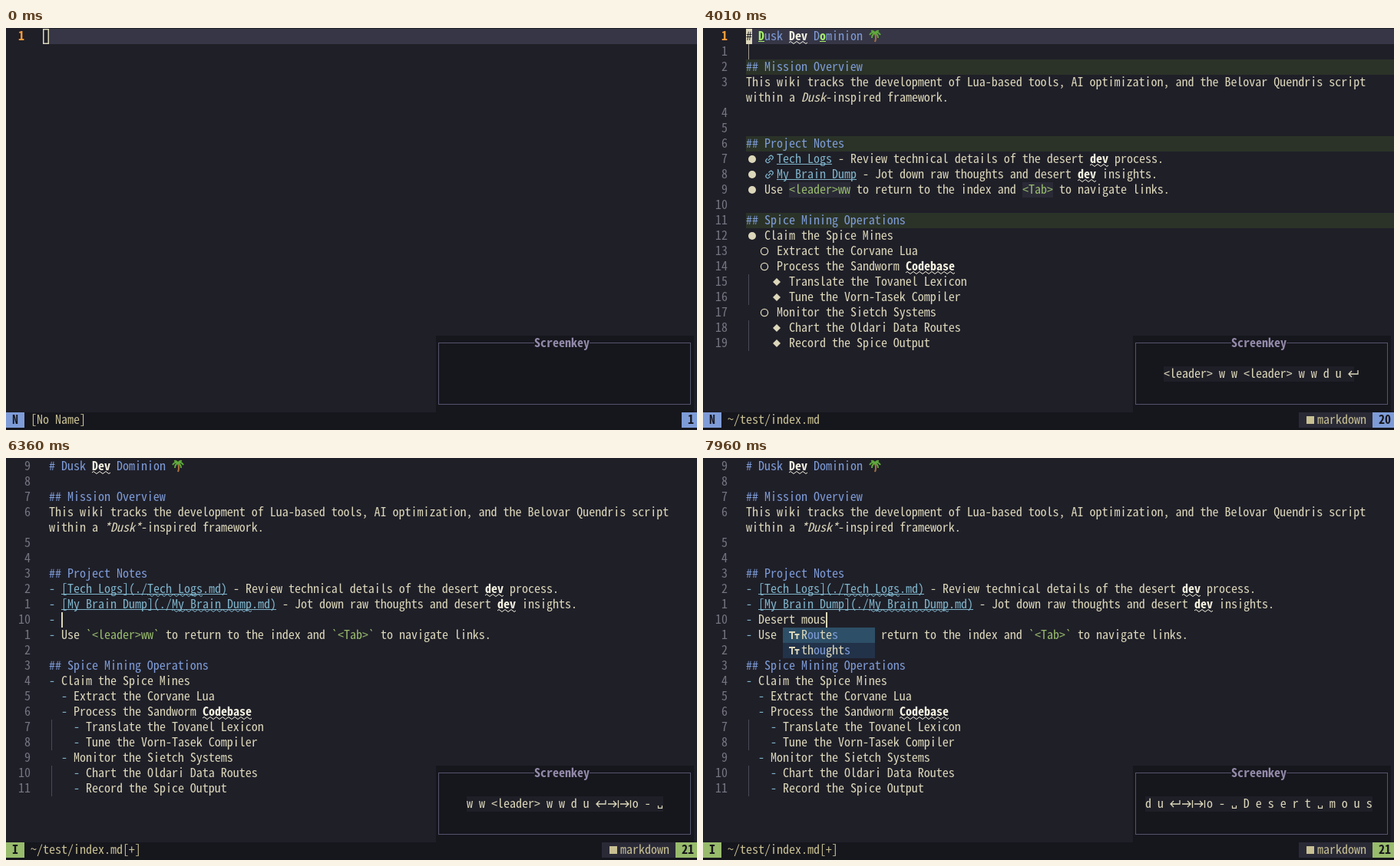
Animation of 900x524 px, one loop 8000 ms. Source, as an HTML page:

```html
<!DOCTYPE html>
<html lang="en">
<head>
<meta charset="utf-8">
<title>Wiki notes in a terminal editor</title>
<style>
  html, body { margin: 0; width: 100%; height: 100%; overflow: hidden; background: #1f1f28; }
  svg { display: block; width: 900px; height: 524px; }
  text {
    font-family: "Noto Sans Mono CJK JP", "Noto Sans Mono CJK SC", "Noto Sans Mono", "DejaVu Sans Mono", monospace;
    font-variant-ligatures: none; font-kerning: none;
    white-space: pre; fill: #dcd7ba;
  }
  .h { fill: #7e9cd8 }
  .s { fill: #f4f1e0; font-weight: bold }
  .i { font-style: italic }
  .l, .m, .d { fill: #7fb4ca }
  .b, .c { fill: #98bb6c }
  .g { fill: #a6f06a; font-weight: bold }
  .y { fill: #5fe8f0; font-weight: bold }
  .n { fill: #757480 }
  .o { fill: #ff9e3b; font-weight: bold }
  .t { fill: #938aa9; font-weight: bold }
  .f { fill: #c8c093 }
  .x { fill: #54546d }
  .r { fill: #d27e99 }
  .k { fill: #16161d; font-weight: bold }
  .q { fill: #1f1f28 }
</style>
</head>
<body>
<svg id="stage" viewBox="0 0 900 524" xmlns="http://www.w3.org/2000/svg"></svg>
<script>
const CW = 8, CH = 20, LOOP = 8000;
const FG = '#dcd7ba', BG = '#1f1f28', DARK = '#16161d', LINE = '#363646', EDGE = '#54546d';
const stage = document.getElementById('stage');

// Pick the font size whose advance is exactly one cell.
const pen = document.createElement('canvas').getContext('2d');
pen.font = '16px "Noto Sans Mono CJK JP","Noto Sans Mono CJK SC","Noto Sans Mono","DejaVu Sans Mono",monospace';
stage.style.fontSize = 16 * CW * 10 / pen.measureText('MMMMMMMMMM').width + 'px';

const esc = s => s.replace(/&/g, '&amp;').replace(/</g, '&lt;');
const rowTop = row => 1 + row * CH;
const rect = (x, y, w, h, fill) => `<rect x="${x}" y="${y}" width="${w}" height="${h}" fill="${fill}"/>`;
const cells = (col, row, w, fill, h = 1) => rect(col * CW, rowTop(row), w * CW, h * CH, fill);
const path = (d, color, width = 1) => `<path d="${d}" fill="none" stroke="${color}" stroke-width="${width}"/>`;
const shape = (d, fill) => `<path d="${d}" fill="${fill}"/>`;
const text = (col, row, s, cls = '') =>
  s.trim() ? `<text class="${cls}" x="${col * CW}" y="${16 + row * CH}">${esc(s)}</text>` : '';

const under = { l: '#7fb4ca', m: '#7fb4ca', g: '#a6f06a', y: '#5fe8f0' };
const waves = { s: '#f4f1e0', m: '#7fb4ca' };

function wave(col, row, n, color) {
  let d = `M${col * CW} ${19 + row * CH}`;
  for (let i = 0; i < n * 2; i++) d += `q2 ${i % 2 ? 3 : -3} 4 0`;
  return path(d, color);
}

// Text with {class|words} runs.
function rich(col, row, s) {
  let out = '';
  for (const [all, cls, body] of s.matchAll(/\{(\w)\|([^}]*)\}|[^{]+/g)) {
    const str = cls ? body : all, n = str.length;
    if (cls === 'b') out += cells(col, row, n, '#2a2a37');
    out += cls === 'a' ? chain(col, row) : text(col, row, str, cls);
    if (under[cls]) out += rect(col * CW, 17 + row * CH, n * CW, 1, under[cls]);
    if (waves[cls]) out += wave(col, row, n, waves[cls]);
    col += n;
  }
  return out;
}

const chain = (col, row) => `<g transform="translate(${col * CW + 6.5} ${11 + row * CH}) rotate(-45)">` +
  path('M-1 -2.5h-2a2.5 2.5 0 0 0 0 5h2M1 -2.5h2a2.5 2.5 0 0 1 0 5h-2M-2.5 0h5', '#7fb4ca', 1.3) + '</g>';

const palm = (x, y) => path(`M${x + 8} ${y + 18}q2 -5 0 -11`, '#a9713f', 2) +
  path(`M${x + 8} ${y + 7}q-4 -3 -7 2M${x + 8} ${y + 7}q-4 1 -4 6M${x + 8} ${y + 7}q4 1 4 6` +
    `M${x + 8} ${y + 7}q4 -3 7 2M${x + 8} ${y + 7}q-2 -4 -5 -3M${x + 8} ${y + 7}q2 -4 5 -3`, '#5fa83c', 2);

const block = (col, row, ch) => cells(col, row, 1, FG) + text(col, row, ch, 'q');
const bar = (col, row) => rect(col * CW, rowTop(row), 2, CH, FG);

/* ---- document ---- */
const link = (name, raw) => {
  const file = name.replace(/ /g, '_');
  return raw ? `{l|[${name}](./}{m|${file}}{l|.md)}` : `{a|  }{l|${name}}`;
};
const code = (s, raw) => raw ? `{c|\`${s}\`}` : `{b|${s}}`;

// Leading digit is a list depth, "~" continues the line above.
const lines = raw => [
  '{h|# Dusk }{s|Dev}{h| Dominion}',
  '',
  '{h|## Mission Overview}',
  'This wiki tracks the development of Lua-based tools, AI optimization, and the Belovar Quendris script',
  `~within a {i|${raw ? '*Dusk*' : 'Dusk'}}-inspired framework.`,
  '',
  '',
  '{h|## Project Notes}',
  `0-${link('Tech Logs', raw)} - Review technical details of the desert {s|dev} process.`,
  `0-${link('My_Brain_Dump', raw)} - Jot down raw thoughts and desert {s|dev} insights.`,
  `0-Use ${code('<leader>ww', raw)} to return to the index and ${code('<Tab>', raw)} to navigate links.`,
  '',
  '{h|## Spice Mining Operations}',
  '0-Claim the Spice Mines',
  '1-Extract the Corvane Lua',
  '1-Process the Sandworm {s|Codebase}',
  '2-Translate the Tovanel Lexicon',
  '2-Tune the Vorn-Tasek Compiler',
  '1-Monitor the Sietch Systems',
  '2-Chart the Oldari Data Routes',
  '2-Record the Spice Output'
];

function bullet(depth, row) {
  const x = (8 + 2 * depth) * CW, y = 11 + row * CH;
  if (depth === 0) return `<circle cx="${x}" cy="${y}" r="5" fill="${FG}"/>`;
  if (depth === 1) return `<circle cx="${x}" cy="${y}" r="4.6" fill="none" stroke="${FG}" stroke-width="1.3"/>`;
  return shape(`M${x} ${y - 5}l5 5l-5 5l-5 -5z`, FG);
}

const guide = (row, color = '#4a4a58') => rect(59, rowTop(row), 1, CH, color);

// raw: plain markdown; cur: cursor row; swap: {row: text} shown in place of a line
function doc({ raw = false, cur, swap = {}, typed = '' }) {
  const list = lines(raw);
  if (raw) list.splice(10, 0, typed);
  const numbers = [];
  let n = 0;
  list.forEach((s, r) => numbers[r] = s[0] === '~' ? 0 : ++n);
  let out = '';
  list.forEach((s, row) => {
    const here = row === cur && !raw;
    if (here) out += cells(7, row, 106, LINE);
    else if (!raw && s.startsWith('{h|# ')) out += cells(7, row, 106, '#49443c');
    else if (!raw && s.startsWith('{h|##')) out += cells(7, row, 106, '#2b3328');
    if (numbers[row]) {
      const num = String(row === cur ? numbers[row] : Math.abs(numbers[row] - numbers[cur]));
      out += text(4 - num.length, row, num, here ? 'o' : 'n');
    }
    const item = s.match(/^(\d)-(.*)$/);
    if (item) {
      const depth = +item[1], col = 7 + 2 * depth;
      if (depth === 2) out += guide(row);
      out += raw || swap[row] ? text(col, row, '-', 'd') : bullet(depth, row);
      out += rich(raw ? col + 2 : col + 3, row, swap[row] || item[2]);
    } else {
      out += rich(7, row, swap[row] || s.replace('~', ''));
    }
  });
  return out + palm(216, 0);
}

/* ---- chrome ---- */
function status(mode, name, count, type) {
  const strip = rect(0, 501, 900, 23, DARK);
  if (!mode) return strip + text(0, 25, name, 'x');
  const color = mode === 'I' ? '#98bb6c' : '#7e9cd8';
  const at = count.length > 1 ? 110 : 111;
  let out = strip + cells(0, 25, 3, color) + text(1, 25, mode, 'k') + text(4, 25, name, 'f');
  if (type) out += cells(97, 25, 12, '#2a2a37') + rect(786, 506, 10, 10, '#c8c093') + text(100, 25, type, 'f');
  return out + rect((at - 1) * CW, 501, 900, 20, color) + text(at, 25, count, 'k');
}

const icons = {
  '⏎': x => path(`M${x + 13} 446v5h-12m4 -4l-4 4l4 4`, FG, 1.3),
  '⇥': x => path(`M${x} 451h11m-4 -4l4 4l-4 4M${x + 13.5} 446v10`, FG, 1.3),
  '␣': x => path(`M${x + 1.5} 453v3.4h5v-3.4`, FG, 1.2)
};

function keys(s) {
  const list = s ? s.split(' ') : [];
  while (list.join(' ').length > 38) list.shift();
  const line = list.join(' '), n = line.length, col = Math.floor(91 - n / 2);
  let out = cells(70, 20, 42, DARK, 5) +
    `<rect x="563.5" y="410.5" width="328" height="80" fill="none" stroke="${EDGE}"/>` +
    cells(86, 20, 9, DARK) + text(86, 20, 'Screenkey', 't') + cells(col, 22, n, BG) +
    text(col, 22, line.replace(/[⏎⇥␣]/g, ' '));
  [...line].forEach((c, i) => { if (icons[c]) out += icons[c]((col + i) * CW); });
  return out;
}

const folder = (x, y) => shape(`M${x + 1} ${y + 14}v-9q0 -1 1 -1h4l2 2h5q1 0 1 1v1h-9l-3 6z` +
  `M${x + 2} ${y + 15}l3 -6h11l-3 6z`, '#c8bd8c');

function picker(query, items, count) {
  let out = cells(15, 9, 82, DARK, 7) +
    `<rect x="123.5" y="190.5" width="648" height="120" rx="3" fill="none" stroke="${EDGE}"/>` +
    cells(49, 9, 13, DARK) + text(50, 9, 'Select wiki', 't') +
    path('M129 206l5 5l-5 5', '#7fb4ca', 2) + text(18, 10, query) + bar(18 + query.length, 10) +
    text(92, 10, count, 'x') + rect(128, 230, 640, 1, EDGE) + cells(16, 12, 80, '#223249');
  items.forEach(([num, name], i) => {
    out += text(17, 12 + i, num + '.', 'r') + folder(160, rowTop(12 + i)) + rich(23, 12 + i, name);
  });
  return out;
}

// Mark the letters of the pattern in order; letters not found are skipped.
function mark(word, pat) {
  const hit = new Set();
  let from = 0;
  for (const c of pat.toLowerCase()) {
    const at = word.toLowerCase().indexOf(c, from);
    if (at >= 0) { hit.add(at); from = at + 1; }
  }
  return [...word].map((c, i) => hit.has(i) ? `{h|${c}}` : c).join('');
}

function popup(col, pat, words) {
  const list = words.split(' '), scroll = list.length > 9;
  const w = 7 + Math.max(...list.map(s => s.length)) + (scroll ? 2 : 0);
  let out = cells(col, 11, w, '#223249', list.length) + cells(col, 11, w, '#2d4f67');
  if (scroll) out += cells(col + w - 1, 11, 1, '#2d4f67', 6);
  list.forEach((s, i) => {
    const x = (col + 1) * CW, y = rowTop(11 + i);
    out += s.endsWith('~')
      ? path(`M${x + 4} ${y + 5}h-3v3m0 4v3h3m6 0h3v-3m0 -4v-3h-3M${x + 4.5} ${y + 7.5}h5m-2.5 0v6`, '#7fb4ca', 1.2)
      : path(`M${x} ${y + 6}h8m-4 0v9M${x + 7.5} ${y + 9}h6m-3 0v6`, FG, 2);
    out += rich(col + 3, 11 + i, mark(s, pat));
  });
  return out;
}

/* ---- screens ---- */
const FILE = '~/test/index.md', OPEN = '<leader> w w <leader> w w';
const empty = (cursor, k) => cells(6, 0, 107, LINE) + text(2, 0, '1', 'o') + cursor +
  keys(k) + status('N', '[No Name]', '1');
const hollow = `<rect x="48.75" y="1.75" width="6.5" height="18.5" fill="${BG}" stroke="${FG}" stroke-width="1.5"/>`;
const solid = cells(6, 0, 1, FG);
const choose = (k, ...args) => text(2, 0, '1', 'n') + picker(...args) + keys(k) + status('', '[No Name]');
const view = (opts, cursor, k) => doc(opts) + cursor + keys(OPEN + ' d u ⏎' + k) + status('N', FILE, '20', 'markdown');
function edit(typed, k, pop = '') {
  const line = typed && '0-' + typed.slice(2);
  return doc({ raw: true, cur: 10, typed: line }) + bar(7 + typed.length, 10) + pop +
    keys(OPEN + ' d u ⏎ ⇥ ⇥ o' + k) + status('I', FILE + '[+]', '21', 'markdown');
}

const all = [['1', '{f|wiki}'], ['2', '{f|dusk}'], ['3', '{f|todo}']];
const title = '{h|  }{g|D}{h|usk }{s|Dev}{h| D}{g|o}{h|minion}';
const logs = link('Tech Logs', true) + ' - ';
const logsTail = 'Review technical details of the desert {s|dev} process.';
const dump = '{l|[}{m|My_Brain_Dump}{l|](./}{g|M}{m|y_Brain_Dump}{l|.m}{g|d}{l|)} - {g|J}ot do{g|w}n ra{y|w} ' +
  't{g|h}oughts and d{g|e}sert {s|dev} insi{y|g}hts.';

const screens = [
  [0, empty(hollow, '')],
  [1070, empty(solid, '')],
  [2160, empty(solid, '<leader> w')],
  [2410, choose(OPEN, '', all, '3/3')],
  [3210, choose(OPEN, 'd', all, '3/3')],
  [3480, choose(OPEN + ' d u', 'du', [['2', '{h|du}{f|sk}']], '1/3')],
  [3730, empty(solid, OPEN + ' d u ⏎')],
  [4010, view({ cur: 0, swap: { 0: title } }, block(7, 0, '#') + guide(1, '#a09d90'), '')],
  [4810, view({ cur: 8, swap: { 8: logs + logsTail.replace('R', '{g|R}') } }, block(11, 8, 'T'), ' ⇥')],
  [5060, view({ cur: 9, swap: { 8: logs + logsTail } }, block(12, 9, 'M'), ' ⇥')],
  [5310, view({ cur: 9, swap: { 9: dump } }, block(11, 9, 'M'), ' ⇥ ⇥')],
  [5580, edit('', '')],
  [6360, edit('- ', ' - ␣')],
  [6610, edit('- D', ' - ␣ D',
    popup(6, 'D', 'Dev Dominion Dusk Data desert development details down dev dateMDY~'))],
  [6860, edit('- De', ' - ␣ D e',
    popup(6, 'De', 'Dev desert development details dev dateMDY~ datetime~ dateDMY~ dateMDY~ datetime~'))],
  [7140, edit('- Dese', ' - ␣ D e s e',
    popup(6, 'Dese', 'desert Codebase development datetime~ datetime~'))],
  [7410, edit('- Desert ', ' - ␣ D e s e r t ␣')],
  [7690, edit('- Desert m', ' - ␣ D e s e r t ␣ m',
    popup(13, 'm', 'Mission Mining Mines Monitor md My_Brain_Dump Dominion framework optimization dateMDY~'))],
  [7960, edit('- Desert mous', ' - ␣ D e s e r t ␣ m o u s', popup(13, 'mous', 'Routes thoughts'))]
];

const start = performance.now();
let shown = -1;
function tick() {
  const now = (performance.now() - start) % LOOP;
  const i = screens.findLastIndex(s => s[0] <= now);
  if (i !== shown) stage.innerHTML = rect(0, 0, 900, 524, BG) + screens[shown = i][1];
  requestAnimationFrame(tick);
}
tick();
</script>
</body>
</html>
```
